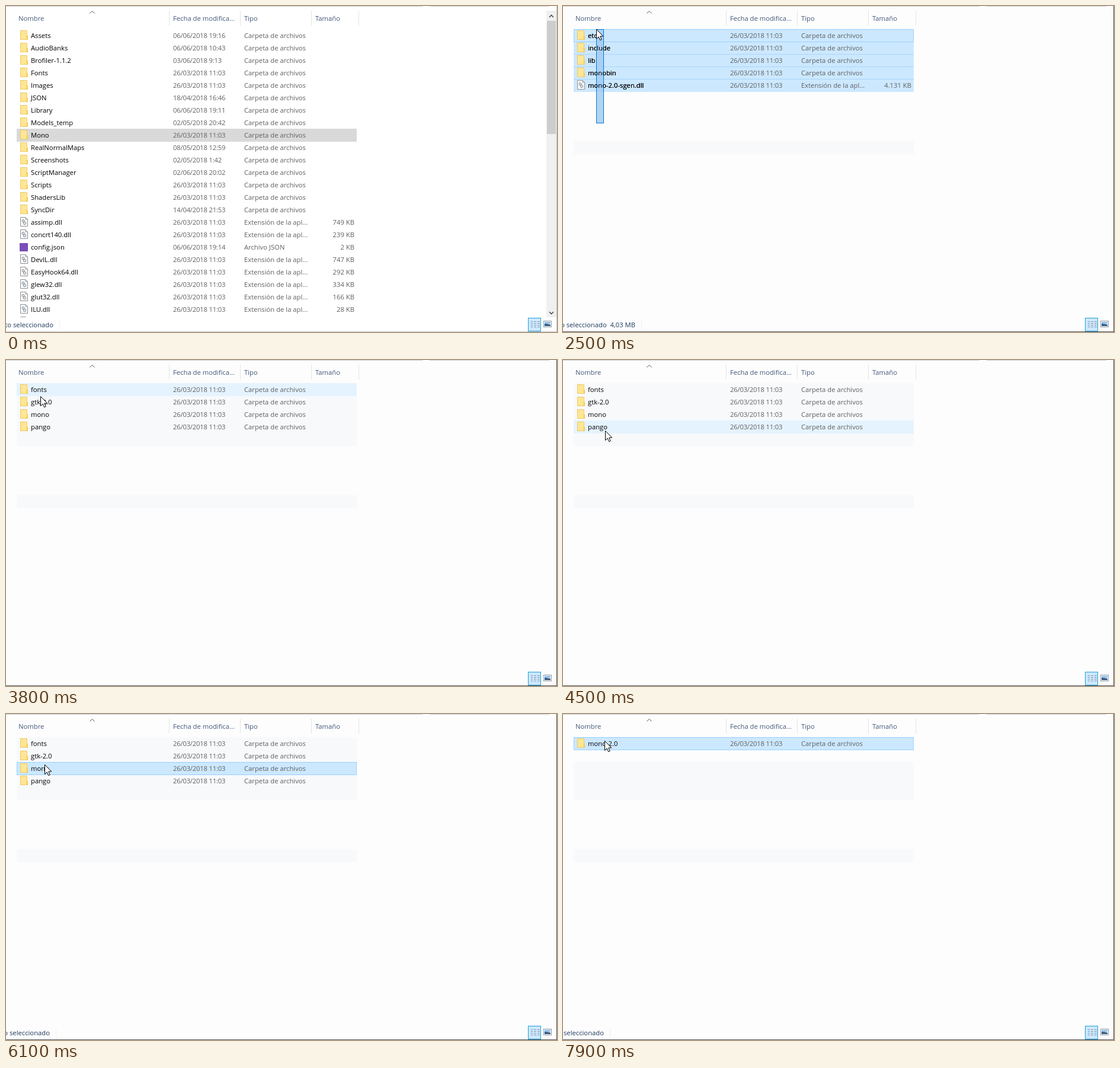
An HTML page for the animation above (8 s loop, 930 by 550 pixels).

```html
<!DOCTYPE html>
<html lang="es">
<head>
<meta charset="utf-8">
<style>
  html, body { margin: 0; width: 100%; height: 100%; overflow: hidden; background: #fdfdfd; }
  svg { display: block; font: 11.25px "Open Sans", "Noto Sans", sans-serif; fill: #606060; }
  .head { fill: #43587a; }
  .name { fill: #000; }
  .date { letter-spacing: -.2px; }
  .end { text-anchor: end; }
  .status { fill: #1e395b; text-anchor: end; }
</style>
</head>
<body>
<svg id="stage" width="930" height="550" viewBox="0 0 930 550">
  <defs>
    <clipPath id="view"><rect y="34" width="912" height="491"/></clipPath>
    <g id="folder">
      <path d="M0 0H8L10 2V16H0Z" fill="#f5d67b"/>
      <path d="M1 1H11V16H1Z" fill="#ffe694"/>
      <path d="M10 9H13V16H10Z" fill="#ffd75e"/>
      <path d="M.5 .5V15.5H12.5V9.5H11.5V.5Z" fill="none" stroke="#e8c461" stroke-width=".8"/>
    </g>
    <g id="dll">
      <path d="M.5 .5H9L12.5 4V15.5H.5Z" fill="#fafafa" stroke="#929292"/>
      <path d="M9 .5V4H12.5" fill="none" stroke="#929292"/>
      <g fill="#e4e9ee" stroke="#7d8791"><circle cx="5" cy="6.5" r="2"/><circle cx="7.5" cy="10.5" r="2.2"/></g>
    </g>
    <path id="arrow" d="M.5 .5V16.5L4.2 13L6.7 18.7L9.2 17.6L6.8 12H11.8Z" fill="#fff" stroke="#000"/>
  </defs>
  <rect id="paper" width="930" height="550"/>
  <path d="M0 .5H703M715 .5H917" stroke="#cfcfcf"/>
  <path d="M275.5 8V33M395.5 8V33M515.5 8V33M595.5 8V33" stroke="#e4e4e4"/>
  <path d="M141.5 12.5L145.5 8.5L149.5 12.5" fill="none" stroke="#555"/>
  <g class="head">
    <text x="21" y="25">Nombre</text>
    <text x="282" y="25">Fecha de modifica...</text>
    <text x="402" y="25">Tipo</text>
    <text x="522" y="25">Tamaño</text>
  </g>
  <g id="list" clip-path="url(#view)"></g>
  <g id="bar">
    <path d="M912 8H929V525H912Z" fill="#f0f0f0"/>
    <path d="M913 25H928V216H913Z" fill="#cdcdcd"/>
    <path d="M917 19L920.5 15.5L924 19M917 516L920.5 519.5L924 516" fill="none" stroke="#505050" stroke-width="1.6"/>
  </g>
  <path id="edge" d="M929.5 0V549.5H0" fill="none"/>
  <rect x="881.5" y="526.5" width="21" height="22" fill="#cce8ff" stroke="#26a0da"/>
  <path d="M886 532.5H889M886 535.5H889M886 538.5H889M886 541.5H889" stroke="#7d93ad"/>
  <path d="M891 532.5H901M891 535.5H901M891 538.5H901M891 541.5H901" stroke="#8b97a4" stroke-dasharray="4 2"/>
  <rect x="907.5" y="531.5" width="13" height="10" fill="#fff" stroke="#8c98a5"/>
  <path d="M909 533H919V536L909 538Z" fill="#8fc0ea"/>
  <path d="M909 540V536L919 537.5V540Z" fill="#34567d"/>
  <g id="foot"></g>
  <g id="top"></g>
</svg>
<script>
const $ = id => document.getElementById(id);
const LOOP = 8000, STEP = 100, ROW = 21, TOP = 39;
const DAY = '26/03/2018 11:03';

// name | size | date
const parse = text => text.trim().split('\n').map(line => {
  const [name, size = '', date = DAY] = line.trim().split('|');
  const ext = (name.match(/\.(dll|json|ini)$/) || [])[1];
  const type = { dll: 'Extensión de la apl...', json: 'Archivo JSON', ini: 'Opciones de confi...' }[ext]
    || (size ? 'Archivo' : 'Carpeta de archivos');
  return { name, size, date, type, icon: ext === 'json' ? 'json' : size ? 'dll' : 'folder' };
});

const lists = {
  project: parse(`Assets||06/06/2018 19:16
    AudioBanks||06/06/2018 10:43
    Brofiler-1.1.2||03/06/2018 9:13
    Fonts
    Images
    JSON||18/04/2018 16:46
    Library||06/06/2018 19:11
    Models_temp||02/05/2018 20:42
    Mono
    RealNormalMaps||08/05/2018 12:59
    Screenshots||02/05/2018 1:42
    ScriptManager||02/06/2018 20:02
    Scripts
    ShadersLib
    SyncDir||14/04/2018 21:53
    assimp.dll|749 KB
    concrt140.dll|239 KB
    config.json|2 KB|06/06/2018 19:14
    DevIL.dll|747 KB
    EasyHook64.dll|292 KB
    glew32.dll|334 KB
    glut32.dll|166 KB
    ILU.dll|28 KB
    ILUT.dll|28 KB`),
  root: parse('etc\ninclude\nlib\nmonobin\nmono-2.0-sgen.dll|4.131 KB'),
  etc: parse('fonts\ngtk-2.0\nmono\npango'),
  mono: parse('2.0\n4.0\n4.5\nmconfig\nbrowscap.ini|303 KB\nconfig|2 KB'),
  include: parse('mono-2.0'),
  none: []
};

// start, list, selected rows, status text, right end of the status
const ONE = '1 elemento seleccionado';
const scenes = [
  [0, 'project', [8], ONE, 80],
  [1300, 'none', [], ONE, 80],
  [1500, 'root', [], '', 0],
  [2200, 'root', [], ONE + '  4,03 MB', 122],
  [2600, 'root', [0, 1, 2, 3, 4], '5 elementos seleccionados', 80],
  [3000, 'root', [], '', 0],
  [3400, 'root', [0], ONE, 74],
  [3600, 'etc', [], '', 0],
  [4900, 'etc', [2], ONE, 74],
  [5200, 'mono', [], '', 0],
  [6000, 'etc', [2], ONE, 74],
  [6200, 'root', [0], ONE, 74],
  [7300, 'root', [1], ONE, 74],
  [7500, 'include', [], '', 0],
  [7900, 'include', [0], ONE, 69]
];

// time, x, y of the pointer
const path = [
  [100, 875, 125], [200, 861, 130], [300, 700, 196], [500, 290, 240], [700, 130, 236],
  [900, 87, 216], [1700, 87, 216], [1900, 88, 148], [2100, 69, 198], [2500, 56, 39],
  [2600, 56, 39], [2900, 69, 172], [3000, 69, 172], [3400, 57, 58], [3700, 58, 61],
  [4300, 58, 61], [4500, 71, 119], [4600, 71, 119], [4900, 65, 85], [5400, 65, 85],
  [5700, 62, 40], [5900, 65, 85], [6300, 65, 85], [6700, 60, 150], [7100, 70, 68],
  [7400, 70, 68], [7900, 70, 45]
];

function pointer(t) {
  const i = path.findIndex(p => p[0] >= t);
  if (i < 1) return path[0].slice(1);
  const [t0, x0, y0] = path[i - 1], [t1, x1, y1] = path[i];
  const k = (t - t0) / (t1 - t0);
  return [Math.round(x0 + (x1 - x0) * k), Math.round(y0 + (y1 - y0) * k)];
}

const band = (i, fill) => `<rect x="18" y="${TOP + i * ROW}" width="574" height="22" fill="${fill}"/>`;

const seam = i => `<path d="M18 ${TOP + i * ROW + .5}H592" stroke="#a9d6fb"/>`;

const frame = i => `<rect x="18.5" y="${TOP + i * ROW + .5}" width="573" height="21" fill="none" stroke="#99d1ff"/>`;

const label = (x, y, text, cls = '') => `<text x="${x}" y="${y}" class="${cls}">${text}</text>`;

function row(f, i) {
  const y = TOP + i * ROW, base = y + 15;
  const icon = f.icon === 'json'
    ? `<rect x="23" y="${y + 4}" width="14" height="14" fill="#7a4fb8"/>`
    : `<use href="#${f.icon}" x="24" y="${y + 2}"/>`;
  return icon + label(42, base, f.name, 'name') + label(282, base, f.date, 'date')
    + label(402, base, f.type) + label(588, base, f.size, 'end');
}

function draw(t) {
  const [, key, picked, status, end] = scenes.filter(s => s[0] <= t).pop();
  const first = key === 'project', files = lists[key];
  const [x, y] = pointer(t);
  const drag = t >= 2100 && t < 2600;
  const over = t >= 100 && x >= 18 && x < 592 ? Math.floor((y - 40.5) / ROW) : -1;
  const hover = drag ? Math.max(over, 0) : over;

  $('paper').setAttribute('fill', first ? '#fff' : '#fdfdfd');
  $('bar').style.display = first ? '' : 'none';
  $('edge').setAttribute('stroke', t < STEP ? '#c4c4c4' : '#555');

  // pale rows left behind by earlier highlights
  const pale = first ? [] : [9];
  if (t >= 3600) pale.push(2, 3, 4);
  if (t >= 3600 && t < 7500) pale.push(0, 1);

  const inBox = i => drag && TOP + (i + 1) * ROW > y;
  const chosen = i => i >= 0 && i < files.length && (inBox(i) || picked.includes(i));

  let html = pale.map(i => band(i, '#f8f9fb')).join('');
  files.forEach((f, i) => {
    if (first && chosen(i) && t < 900) html += band(i, '#d9d9d9');
    else if (chosen(i)) html += band(i, '#cce8ff') + (chosen(i - 1) ? seam(i) : '');
    else if (i === hover) html += band(i, '#e5f3ff');
  });
  if (chosen(hover) && !(first && t < 900)) html += frame(hover);
  html += files.map(row).join('');
  if (t >= 1400 && t < 1500) html += label(391, 60, 'Estamos trabajando en ello...');
  $('list').innerHTML = html;

  $('foot').innerHTML = status
    ? `<text x="${end}" y="542" class="status" xml:space="preserve">${status}</text>`
      + `<path d="M${end + 10.5} 531V545" stroke="#f0f0f0"/>`
    : '';

  let top = '';
  if (drag) {
    top += `<rect x="${x + .5}" y="${y + .5}" width="${68 - x}" height="${197 - y}"
      fill="#a6ccf0" fill-opacity=".85" stroke="#0078d7"/>`;
    // names stay readable under the drag box
    top += files.map((f, i) => label(42, TOP + i * ROW + 15, f.name, 'name')).join('');
  }
  if (t >= STEP) top += `<use href="#arrow" x="${x}" y="${y}"/>`;
  if (t === 1000) top += `<circle cx="${x + 21}" cy="${y + 20}" r="5.5" fill="none" stroke="#3ba5dc" stroke-width="3"/>`;
  $('top').innerHTML = top;
}

let last = -1;
const start = performance.now();
function tick() {
  const t = Math.floor((performance.now() - start) % LOOP / STEP) * STEP;
  if (t !== last) draw(last = t);
  requestAnimationFrame(tick);
}
tick();
</script>
</body>
</html>
```
